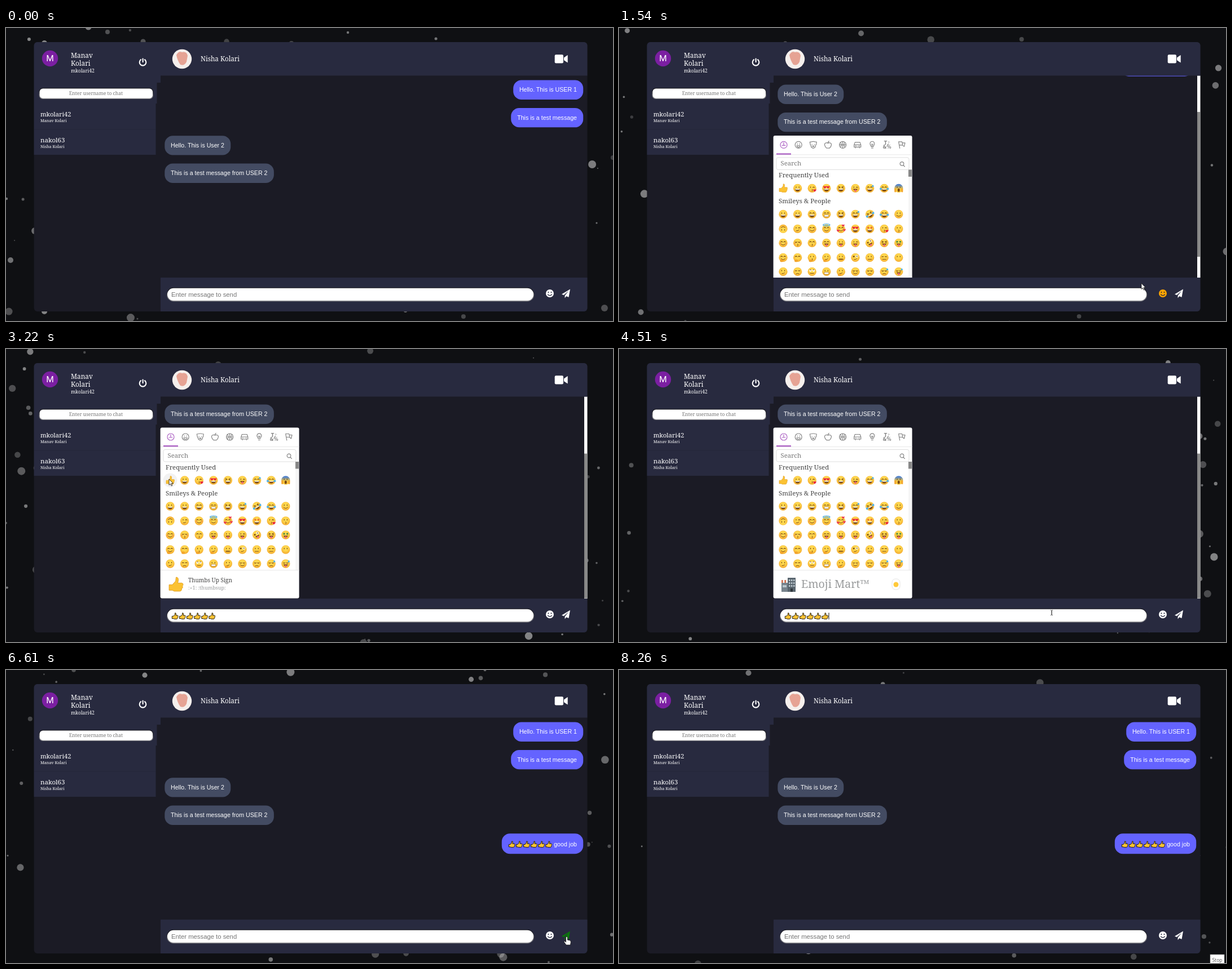
Write an HTML page that moves like this. It is 1076 by 520 pixels and loops after 8.29 s.

```html
<!DOCTYPE html>
<html lang="en">
<head>
<meta charset="utf-8">
<title>Chat</title>
<style>
html, body { margin: 0; width: 100%; height: 100%; overflow: hidden; background: #0f1013; }
svg { display: block; width: 100vw; height: 100vh; }
text { white-space: pre; font-family: "Noto Serif", serif; font-weight: 300; fill: #fff; }
.sans { font-family: "Liberation Sans", Arial, sans-serif; font-weight: 400; }
.icon { fill: none; stroke: #858585; stroke-width: 1.2; stroke-linecap: round; stroke-linejoin: round; }
</style>
</head>
<body>
<svg id="stage" viewBox="0 0 1076 520" xmlns="http://www.w3.org/2000/svg"></svg>
<script>
const LOOP = 8290, PANEL = '#282a3f';
const stage = document.getElementById('stage');

// ---- markup helpers ----
const rect = (x, y, w, h, fill, r = 0, more = '') =>
  `<rect x="${x}" y="${y}" width="${w}" height="${h}" rx="${r}" fill="${fill}" ${more}/>`;
const disc = (x, y, r, fill, more = '') => `<circle cx="${x}" cy="${y}" r="${r}" fill="${fill}" ${more}/>`;
const path = (d, fill, more = '') => `<path d="${d}" fill="${fill}" ${more}/>`;
const text = (x, y, size, str, more = '') => `<text x="${x}" y="${y}" font-size="${size}" ${more}>${str}</text>`;
const group = (inner, more = '') => `<g ${more}>${inner}</g>`;
const at = (x, y, inner, scale = 1) => group(inner, `transform="translate(${x} ${y}) scale(${scale})"`);
const range = (n, fn) => Array.from({ length: n }, (_, i) => fn(i));

// ---- emoji ----
const INK = '#7a4a14';
const EYES = {
  o: 'M-2.6-2.6v1.4M2.6-2.6v1.4',
  '^': 'M-4.2-1.4q1.5-2.2 3 0M1.2-1.4q1.5-2.2 3 0',
  x: 'M-4.1-3l2.4 1.3-2.4 1.3M4.1-3l-2.4 1.3 2.4 1.3',
  w: 'M-2.6-2.6v1.4M1.4-1.4q1.4-1.5 2.8 0',
  u: 'M-4.2-1.6q1.5 1.6 3 0M1.2-1.6q1.5 1.6 3 0',
  '-': 'M-4.2-1.6h2.8M1.4-1.6h2.8'
};
const MOUTHS = {
  s: 'M-3.6 2q3.6 3.6 7.2 0', k: 'M0 1.8q2 .8 0 1.6q2 .8 0 1.6', _: 'M-3 3h6',
  m: 'M-2 3.4q3 .4 4.4-1.4', f: 'M-2.6 4q2.6-2 5.2 0', n: '', z: 'M-4 3h8M-2 2v2M0 2v2M2 2v2'
};
const HEART = 'M0 2.4C-4-.4-2.4-2.8 0-1.1C2.4-2.8 4-.4 0 2.4z';
const THUMB = 'M-7 .2H-3.6L-.2-3.6L.3-7.6C2.8-7.8 3.2-5 2-1.6H6.2C8 -1.4 8 1 6.8 1.4C7.7 2.8 7 4 6 4.2' +
  'C6.4 5.8 5.6 7 4 7H-1.6L-3.6 6H-7z';

function eyes(kind) {
  const pair = fn => fn(-2.8) + fn(2.8);
  if (kind === 'h') return pair(x => at(x, -2, path(HEART, '#e8263d'), 1.1));
  if (kind === '*') return pair(x => at(x, -2, path('M0-2.8l.8 2 2 .8-2 .8-.8 2-.8-2-2-.8 2-.8z', '#e8632d')));
  if (kind === '$') return pair(x => disc(x, -2, 1.7, '#4c8c3f'));
  if (kind === 'r') return pair(x => disc(x, -2, 2.1, '#fff') + disc(x, -3.2, .9, INK));
  if (kind === 'b') return disc(-2.8, -2, 1.5, INK) + disc(2.8, -2.4, 2.2, '#fff') + disc(2.8, -2.4, 1, INK);
  return path(EYES[kind], 'none', `stroke="${INK}" stroke-width="1.2" stroke-linecap="round"`);
}
function mouth(kind) {
  if (kind === 'D') return path('M-4.4 1h8.8q-.4 4.6-4.4 4.6t-4.4-4.6z', INK) + rect(-3.7, 1, 7.4, 1.5, '#fff');
  if (kind === 't') return path('M-3.8 1.2h7.6q-.4 2.8-3.8 2.8t-3.8-2.8z', INK) + rect(-1.5, 2.2, 3.2, 3.8, '#f0647f', 1.6);
  if (kind === 'g') return rect(-4.2, 1, 8.4, 3.6, '#fff', 1.8, `stroke="${INK}" stroke-width=".6"`);
  if (kind === 'O') return `<ellipse cy="3.4" rx="2" ry="3" fill="${INK}"/>`;
  return path(MOUTHS[kind], 'none', `stroke="${INK}" stroke-width="1" stroke-linecap="round"`);
}
const EXTRA = {
  j: disc(-6.2, 1.2, 2, '#4fb4ee') + disc(6.2, 1.2, 2, '#4fb4ee'),
  a: '<ellipse cy="-6.8" rx="6" ry="1.7" fill="none" stroke="#46a8e0" stroke-width="1.4"/>',
  d: disc(5.4, -4, 1.7, '#4fb4ee'),
  v: at(-5, 3, path(HEART, '#ea3b50')) + at(6, 2, path(HEART, '#ea3b50')) + at(4, -6, path(HEART, '#ea3b50')),
  p: rect(-5.6, 3.6, 6, 4.2, '#f3a52c', 2),
  l: disc(-5, 1.2, 1.4, '#f39a4a') + disc(5, 1.2, 1.4, '#f39a4a'),
  h: at(4.8, 3.8, path(HEART, '#e8263d'), 1.1),
  c: rect(-7.6, 0, 3, 7, '#f3a52c', 1.5) + rect(4.6, 0, 3, 7, '#f3a52c', 1.5)
};
const thumb = more => path(THUMB, '#fbc233', more);
function emoji(code) {
  if (code === 'T') return thumb('stroke="#e09a1c" stroke-width=".6"');
  const [e, m, ...rest] = code;
  const turn = rest.includes('U') ? 180 : rest.includes('R') ? -30 : 0;
  const skin = rest.includes('c') ? 'url(#fright)' : 'url(#skin)';
  const extra = rest.map(c => EXTRA[c] || '').join('');
  return group(disc(0, 0, 7.7, skin) + eyes(e) + mouth(m) + extra, `transform="rotate(${turn})"`);
}
const ROWS = [
  [93, 'T oD wkh hD xD wt ^Dd ^Dj oOc'],
  [139, 'oD oD ^D ^g xD ^Dd xDjR ^Dj os'],
  [165, 'osU wm ^sl ^sa ^sv hD *D wkh ok'],
  [190, '^sl ukl ^k ^t ot wt btR xt $t'],
  [216, '^sp ^np okp omp oz bm o_ -_ on'],
  [241, 'om -f r_ og omp us uf ufd utd']
];

// ---- emoji picker, its top left corner at y 0 ----
const CATEGORIES = [
  'M6 0A6 6 0 1 1-6 0A6 6 0 1 1 6 0M0-4V1H3M0 1H-3',
  'M6 0A6 6 0 1 1-6 0A6 6 0 1 1 6 0M-2-2v1M2-2v1M-3 1.5h6q-.6 3-3 3t-3-3z',
  'M-6-5l3-.5q3-1 6 0l3 .5-1 5-1 1q0 4-4 5-4-1-4-5l-1-1zM-2-1v.5M2-1v.5M-1.5 2h3l-1.5 1.5z',
  'M0-3q4-2 6 1.5q0 5-4 7.5-2-.8-4 0q-4-3-4-7.5q2-3.5 6-1.5M0-3q0-3 2-3.5',
  'M6 0A6 6 0 1 1-6 0A6 6 0 1 1 6 0M-6 0H6M0-6V6M-4-4.3q3.6 4 0 8.6M4-4.3q-3.6 4 0 8.6',
  'M-6 0l1.6-4.5h8.8L6 0v4h-2.5v1.5M-6 0v4h2.5v1.5M-6 0H6M-3.5 4h7M-3.5 2h1M2.5 2h1',
  'M-2 3q0-2-1.5-3.2A4 4 0 1 1 3.5-.2Q2 1 2 3zM-1.5 5.5h3M0 3V0l-1.5-1.5M0 0l1.5-1.5',
  null,
  'M-5.5-5.5l2 11.5M-5.5-5.5h6l1 6h-5.8M.8-3.5h5l-1.5 6.5-3.3-2.5'
];
const SYMBOLS = ['T♪', '&amp;%'].map((s, i) => text(0, 7 * i - .5, 8, s,
  'text-anchor="middle" style="font:700 8px DejaVu Sans,sans-serif;fill:#858585"')).join('');
const grey = c => `style="fill:${c}"`;

function picker() {
  const tabs = CATEGORIES.map((d, i) => at(292 + 26.15 * i, 16,
    d ? path(d, 'none', `class="icon" ${i ? '' : 'style="stroke:#ae65c5"'}`) : SYMBOLS)).join('');
  const faces = ROWS.map(([y, codes]) =>
    codes.split(' ').map((c, i) => at(291 + 25.6 * i, y, emoji(c))).join('')).join('');
  const shop = rect(288, 270, 11, 21, '#77838c') + rect(299, 266, 14, 25, '#59656e') +
    range(9, i => rect(301 + 4 * (i % 3), 269 + 5 * Math.floor(i / 3), 2.5, 3, '#b9c5cc')).join('') +
    range(4, i => rect(288 + 2.75 * i, 270, 2.75, 5, i % 2 ? '#fff' : '#d9734f')).join('') +
    rect(290, 279, 7, 4, '#b9c5cc') + rect(304, 285, 4, 6, '#2e363c');
  const idle = shop + text(323, 284, 19.5, 'Emoji Mart™', grey('#999b9c')) +
    rect(484, 268, 14, 19, '#fff', 6, 'stroke="#e4e4e4"') + disc(491, 278, 4.5, '#ffc93a');
  const preview = at(301, 278, thumb('stroke="#e09a1c" stroke-width=".5"'), 1.7) +
    text(323, 274, 10, 'Thumbs Up Sign', grey('#444')) +
    text(323, 287, 9, ':+1: :thumbsup:', grey('#999b9c'));
  return rect(273.6, -.5, 246, 303, '#fff', 3) +
    rect(274, 33, 245.5, 1, '#e8e8e8') + rect(279, 31, 26, 2.4, '#ae65c5') + tabs +
    rect(279, 38.5, 235, 21.5, '#fff', 3, 'stroke="#dedede"') + text(286.5, 52.5, 11.3, 'Search', grey('#777')) +
    path('M504.8 49.5a3.3 3.3 0 1 1-6.6 0a3.3 3.3 0 1 1 6.6 0M504 52l2.4 2.6', 'none', 'class="icon"') +
    rect(513, 60, 6, 192, '#f6f6f6') + rect(513, 60, 6, 12.5, '#888') +
    text(283, 74, 11.4, 'Frequently Used', grey('#444')) + text(283, 120, 11.4, 'Smileys &amp; People', grey('#444')) +
    group(disc(291, 93, 12.5, '#f2f2f2'), 'id="halo"') + faces +
    rect(274, 252, 245.5, 1, '#e8e8e8') + group(idle, 'id="idle"') + group(preview, 'id="preview"');
}

// ---- chat window ----
const bubble = (x, y, w, h, fill) => rect(x, y, w, h, fill, 14.5);
const mine = (x, y, h = 34.4) => bubble(x, y, 1023.2 - x, h, '#6463ff');
const theirs = (y, w) => bubble(281.3, y, w, 34.4, '#434b62');
const say = (x, y, str) => text(x, y, 10.65, str, 'class="sans"');
const sayMine = (y, str) => text(1012, y, 10.65, str, 'class="sans" text-anchor="end"');
const thumbs = (x, y, id = '') => range(6, i =>
  group(at(x + 13.1 * i, y, thumb('stroke="#111" stroke-width="1.3"'), .74), id && `id="${id}${i}"`)).join('');
// Sunken text field: dark upper rim, light lower rim.
const field = (x, y, w, h, r) => rect(x, y, w, h, 'url(#rim)', r) + rect(x + 1.2, y + 1.2, w - 2.4, h - 2.6, '#fff', r - 1.2);

const PLANE = 'M1000 463.5L985 472.5L988.8 474.1L997.2 466.6L990.6 475V479.2L993.2 476.1L997.5 477.8z';
const HAND = 'M-1.5 0Q0-1.5 1.3 0V5L5.5 5.8Q7.5 6.5 7.3 9L6.5 14H-1L-4.8 8.6Q-5 6.8-3.2 7.4L-1.5 9z';

const card = rect(49.6, 25, 980.9, 478, '#1b1b25', 6);
const chat = group(group(
    group(mine(899.2, 92.6) + sayMine(113, 'Hello. This is USER 1') + mine(895.2, 141.9) + sayMine(162.5, 'This is a test message') +
      group(mine(878.8, 290.2, 36) + thumbs(896.5, 309.5) + sayMine(312.5, 'good job'), 'id="sent"'), 'id="mine"') +
    theirs(191.2, 117) + say(292, 212, 'Hello. This is User 2') +
    theirs(240.5, 193.6) + say(292, 261, 'This is a test message from USER 2') +
    group(picker(), 'id="picker" transform="translate(0 282)"'), 'id="scroll"') +
  group(rect(1025, 84, 5.5, 359, '#fff') + rect(1025, 84.5, 5.5, 257, '#888', 0, 'id="bar"'), 'id="track"'),
  'clip-path="url(#view)"');

const sidebar = path('M49.6 31a6 6 0 0 1 6-6H274V97H267.5V134H265.5V225H49.6z', PANEL) + rect(50, 179.5, 215, 1, '#25273a') +
  disc(78, 54, 14.2, '#7b1fa2') +
  text(78, 59, 15.5, 'M', 'text-anchor="middle" style="font-family:Roboto,sans-serif;font-weight:400"') +
  text(115, 53, 11.8, 'Manav') + text(115, 67, 11.8, 'Kolari') + text(115, 78.5, 8.6, 'mkolari42') +
  path('M239 56.2a5.8 5.8 0 1 0 7 0M242.6 54.5v5.8', 'none', 'stroke="#fff" stroke-width="2.1" stroke-linecap="round"') +
  field(58.4, 106.3, 202.8, 19.8, 7) +
  text(159.5, 119, 8.5, 'Enter username to chat', 'text-anchor="middle" style="fill:#757575"') +
  text(61, 157, 11.2, 'mkolari42') + text(61, 167, 7.2, 'Manav Kolari') +
  text(61, 202.5, 11.5, 'nakol63') + text(61, 212.5, 7.2, 'Nisha Kolari');

const header = path('M274 25H1024.5a6 6 0 0 1 6 6V84.5H274z', PANEL) +
  disc(312, 55, 17.2, '#f5efec') + path('M302 48q4-8 10-5q8-2 10 6l-2 11q-4 8-11 5q-5-7-7-17z', '#e6a394') +
  text(345, 59, 11.7, 'Nisha Kolari') +
  rect(972.7, 47.2, 15.3, 15.3, '#fff', 2.3) + path('M989 52.5l6.700-4.400v13.500l-6.700-4.400z', '#fff');

const footer = path('M274 443H1030.5V497a6 6 0 0 1-6 6H274z', PANEL) +
  field(284.8, 460.6, 651.6, 24.6, 12.3) +
  text(293, 476.5, 11.3, 'Enter message to send', 'id="hint" class="sans" style="fill:#757575"') +
  thumbs(299.5, 474, 'up') + text(371.5, 477, 10.9, '', 'id="typed" class="sans" style="fill:#111"') +
  rect(371.5, 468, 1, 12, '#111', 0, 'id="caret"') +
  disc(964, 471, 7, '#fff', 'id="smile"') + disc(961.5, 469, 1.1, PANEL) + disc(966.5, 469, 1.1, PANEL) +
  path('M960.5 473q3.5 3.6 7 0', 'none', `stroke="${PANEL}" stroke-width="1.2" stroke-linecap="round"`) +
  path(PLANE, '#fff', 'id="send"');

const cursors =
  group(path('M0 0V10.5L2.5 8.2L4.2 12L5.8 11.2L4.2 7.6H7.4z', '#fff', 'stroke="#111" stroke-width=".8"'), 'id="arrow"') +
  group(path('M-2-4.500q2 0 2 1.500v6q0 1.500-2 1.500M2-4.500q-2 0-2 1.500v6q0 1.500 2 1.500', 'none', 'stroke="#333" stroke-width=".8"'), 'id="beam"') +
  group(path(HAND, '#fff', 'stroke="#111" stroke-width=".8"'), 'id="hand"');

stage.innerHTML = `<defs>
  <radialGradient id="skin" cy=".38" r=".68"><stop offset=".35" stop-color="#ffd84e"/><stop offset="1" stop-color="#f2a32a"/></radialGradient>
  <linearGradient id="fright" x2="0" y2="1"><stop offset=".1" stop-color="#4a7fd0"/><stop offset=".6" stop-color="#f9c93c"/></linearGradient>
  <linearGradient id="rim" x2="0" y2="1"><stop offset=".2" stop-color="#1a1a22"/><stop offset=".9" stop-color="#8a8a8e"/></linearGradient>
  <clipPath id="view"><rect x="273" y="84.5" width="758" height="358.5"/></clipPath></defs>` +
  rect(0, 0, 1076, 520, '#0f1013') + group('', 'id="dots"') + card + chat + sidebar + header + footer +
  group(rect(1048, 505, 25, 16, '#fff', 0, 'stroke="#999" stroke-width=".6"') +
    text(1060.5, 517.5, 8.6, 'Stop', 'text-anchor="middle" style="font-family:Open Sans,sans-serif;font-weight:400;fill:#555"'), 'id="stop"') +
  group(cursors, 'id="cursor"');

const ui = {};
stage.querySelectorAll('[id]').forEach(el => ui[el.id] = el);
const show = (el, on) => el.setAttribute('display', on ? 'inline' : 'none');
const move = (el, x, y) => el.setAttribute('transform', `translate(${x} ${y})`);

// ---- drifting dots: a few start in the margin, the rest behind the card ----
let seed = 41;
const rnd = (a = 0, b = 1) => {
  seed = (seed * 16807) % 2147483647;
  return a + (b - a) * seed / 2147483647;
};
const EDGE = [41,20,3, 68,27,5, 146,-2,5.5, 180,7,4, 220,4,2.2, 243,24,4.5, 391,24,4.7, 506,27,4, 606,8,2.2, 762,19,2.5,
  1,303,2.2, 30,304,2.5, 51,360,6, 15,377,1, 8,412,5, 5,503,6.5, 221,514,7, 233,516,1.5, 68,503,5, 708,502,3, 811,512,4,
  1061,497,6, 1039,242,7, 1049,249,1, 1047,346,1.6, 1076,230,4];
const dot = (x, y, r) => ({ x, y, r, vx: rnd(-.11, .11), vy: rnd(-.11, .11), a: rnd(.18, .5) });
const dots = range(EDGE.length / 3, i => dot(...EDGE.slice(3 * i, 3 * i + 3)))
  .concat(range(95, () => dot(rnd(58, 1022), rnd(33, 495), rnd(.8, 6.8))));
ui.dots.innerHTML = dots.map(d => disc(0, 0, d.r, '#fff', `opacity="${d.a}"`)).join('');
dots.forEach((d, i) => d.el = ui.dots.children[i]);
const wrap = (v, size) => ((v + 8) % (size + 16) + size + 16) % (size + 16) - 8;

// ---- timing ----
const smooth = p => { p = Math.max(0, Math.min(1, p)); return p * p * (3 - 2 * p); };
const STALLS = [[1020, 1280], [1310, 1510]];
const MOVES = [ // start, end, x, y
  [150, 860, 963, 466], [1440, 2150, 289, 231], [3320, 4000, 767, 468],
  [5850, 6400, 994, 474], [6950, 7700, 1066, 532]
];
const OPEN = 1280, SEND = 6500, CLICK = 4050, TYPE = 4700, REPLY = ' good job';

function draw(clock) {
  let t = clock, lost = 0;
  for (const [a, b] of STALLS) {
    lost += Math.max(0, Math.min(clock, b) - a);
    if (clock > a && clock < b) t = a;
  }
  for (const d of dots) {
    const age = clock - lost;
    d.el.setAttribute('cx', wrap(d.x + d.vx * age, 1076));
    d.el.setAttribute('cy', wrap(d.y + d.vy * age, 520));
  }

  const open = t >= OPEN && t < SEND;
  const scroll = open ? 142 * smooth((t - OPEN) / 440) : 0;
  move(ui.scroll, 0, -scroll);
  move(ui.mine, open ? -6 : 0, 0);
  move(ui.bar, 0, scroll * .712);
  show(ui.picker, open);
  show(ui.track, open);
  show(ui.sent, t >= SEND);

  const over = t >= 2080 && t < 3400;
  show(ui.halo, over);
  show(ui.preview, over);
  show(ui.idle, !over);

  const count = t < SEND ? Math.max(0, Math.min(6, Math.floor((t - 2300) / 150) + 1)) : 0;
  for (let i = 0; i < 6; i++) show(ui['up' + i], i < count);
  show(ui.hint, !count);
  const chars = t < SEND ? Math.max(0, Math.floor((t - TYPE) / 130) + 1) : 0;
  ui.typed.textContent = REPLY.slice(0, chars);
  const typing = t >= TYPE && t < TYPE + 1300;
  show(ui.caret, t >= CLICK && t < SEND && (typing || Math.floor((t - CLICK) / 500) % 2 === 0));
  move(ui.caret, chars ? ui.typed.getComputedTextLength() : 0, 0);

  ui.smile.setAttribute('fill', t >= 800 && t < 1570 ? '#ffa500' : '#fff');
  ui.send.setAttribute('fill', t >= 6330 && t < 7130 ? '#0a7a0a' : '#fff');
  show(ui.stop, t >= 8000);

  let x = 1090, y = 500;
  for (const [a, b, tx, ty] of MOVES) {
    const p = smooth((t - a) / (b - a));
    x += (tx - x) * p;
    y += (ty - y) * p;
  }
  const inBar = y > 461 && y < 485;
  const beam = inBar && x > 285 && x < 936;
  const hand = inBar && (Math.abs(x - 964) < 8 || Math.abs(x - 993) < 9);
  move(ui.cursor, x, y);
  show(ui.beam, beam);
  show(ui.hand, hand);
  show(ui.arrow, !beam && !hand);
}

const begin = performance.now();
function tick() {
  draw((performance.now() - begin) % LOOP);
  requestAnimationFrame(tick);
}
tick();
</script>
</body>
</html>
```
